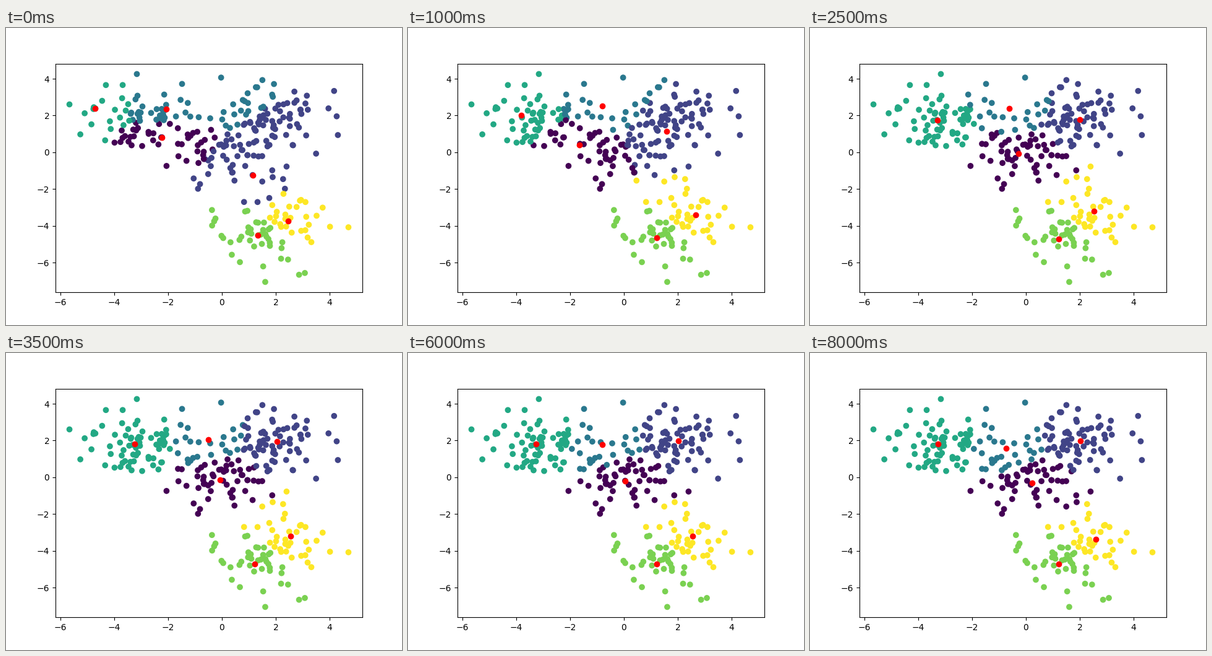
A matplotlib script that plays this animation: 640x480 px, repeating every 8.5 s.

```python
import numpy as np
import matplotlib.pyplot as plt
from matplotlib.animation import FuncAnimation

STEPS = 17
INTERVAL = 500
BLOB_CENTERS = [(0, 0), (2, 2), (-3, 2), (2, -4)]
BLOB_SIZE = 75
# Approximate starting centroids, snapped to the closest data point.
SEEDS = [(-2.227, 0.815), (1.139, -1.235), (-2.065, 2.335),
         (-4.705, 2.38), (1.345, -4.52), (2.468, -3.76)]


def make_points():
    rng = np.random.RandomState(0)
    blobs = [rng.normal(loc=c, scale=1.0, size=(BLOB_SIZE, 2))
             for c in BLOB_CENTERS]
    points = np.concatenate(blobs)
    order = np.arange(len(points))
    rng.shuffle(order)
    return points[order]


def distances(a, b):
    return np.linalg.norm(a[:, None] - b[None], axis=2)


def run_kmeans(points):
    """Return the (centroids, labels) pair of every iteration."""
    centroids = points[distances(np.array(SEEDS), points).argmin(axis=1)]
    history = []
    for _ in range(STEPS):
        labels = distances(points, centroids).argmin(axis=1)
        history.append((centroids, labels))
        centroids = np.array([points[labels == k].mean(axis=0)
                              for k in range(len(SEEDS))])
    return history


points = make_points()
history = run_kmeans(points)

fig, ax = plt.subplots(figsize=(6.4, 4.8), dpi=100)
first_centroids, first_labels = history[0]
dots = ax.scatter(points[:, 0], points[:, 1], c=first_labels,
                  cmap="viridis", vmin=0, vmax=len(SEEDS) - 1)
marks = ax.scatter(first_centroids[:, 0], first_centroids[:, 1], c="r")


def update(step):
    centroids, labels = history[step]
    dots.set_array(labels)
    marks.set_offsets(centroids)
    return dots, marks


anim = FuncAnimation(fig, update, frames=STEPS, interval=INTERVAL,
                     repeat=True, repeat_delay=0)
plt.show()
```
